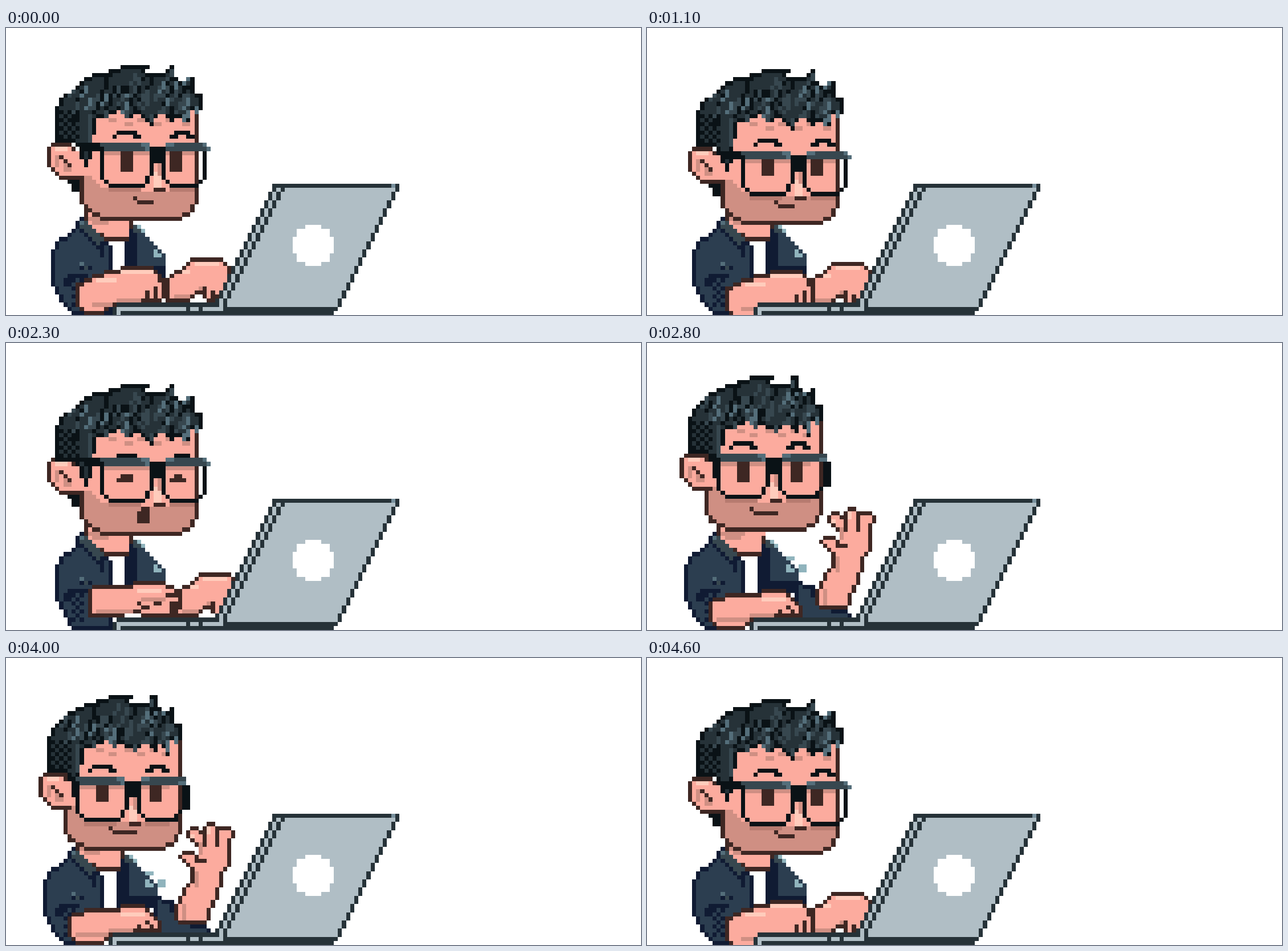
These frames come from a looping animation (1114x503 px, 4700 ms). An HTML page with a canvas:

```html
<!DOCTYPE html>
<html lang="en">
<head>
<meta charset="utf-8">
<title>Typing and waving</title>
<style>
  html, body { margin: 0; width: 100%; height: 100%; overflow: hidden; background: #fff; }
  canvas { display: block; width: 100%; height: 100%; image-rendering: pixelated; }
</style>
</head>
<body>
<canvas id="stage" width="155" height="70"></canvas>
<script>
const g = document.getElementById('stage').getContext('2d');
const C = {
  skin: '#fcab9e', shade: '#cf8f83', glow: '#ffccbc', line: '#3e2723',
  hair: '#263238', black: '#0a1216', slate: '#37474f', shine: '#546e7a',
  coat: '#2c3e50', navy: '#101b33', mint: '#90b4bd', metal: '#b0bec5'
};
let ox = 0, oy = 0;

const at = (x, y) => { ox = x; oy = y; };

function px(color, x, y, w = 1, h = 1) {
  g.fillStyle = color;
  g.fillRect(Math.round(x + ox), Math.round(y + oy), w, h);
}

const points = text => text.split(' ').map(p => p.split(',').map(Number));

// Fills a polygon cell by cell, with a one-cell outline inside its edge.
function shape(pts, fill, line, map = p => p) {
  const poly = pts.map(p => map(p));
  const cells = new Set();
  const key = (x, y) => y * 1000 + x;
  for (let y = 0; y < 75; y++) {
    const cuts = [];
    poly.forEach(([x1, y1], i) => {
      const [x2, y2] = poly[(i + 1) % poly.length];
      const c = y + 0.5;
      if ((y1 <= c) !== (y2 <= c)) cuts.push(x1 + (c - y1) / (y2 - y1) * (x2 - x1));
    });
    cuts.sort((a, b) => a - b);
    for (let i = 0; i + 1 < cuts.length; i += 2)
      for (let x = Math.ceil(cuts[i] - 0.5); x + 0.5 < cuts[i + 1]; x++) cells.add(key(x, y));
  }
  const has = (x, y) => cells.has(key(x, y));
  for (const k of cells) {
    const x = k % 1000, y = (k - x) / 1000;
    const edge = !(has(x - 1, y) && has(x + 1, y) && has(x, y - 1) && has(x, y + 1));
    const color = edge && line ? line : fill;
    if (color) px(color, x, y);
  }
  return has;
}

const FACE = points('18,17 47,17 47,42 46,44 45,46 42,47 24,47 22,46 20,45 19,44 18,41');
const BEARD = points('19,34 21,36 24,39 33,40 36,40 46,39 46,43 45,45 42,46 24,46 20,44 19,41');
const EAR = points('12,28 16,28 18,30 18,37 14,37 12,36 11,34 10,33 10,30 11,29');
const HAIR = points('12,20 13,18 15,16 18,13.5 20,12 23,11 27,10 30,9 35,9 34,10.5 39,11 40,9 41,9 41,12 44,13 45,12 46,12 46,16 48,16 48,19 47,21 45,20 45,23 44,24 43,22 42,21 41,23 39,21 37,21 36,24 35,23 34,22 32,21 30,22 28,20 26,21 25,22 22,22 22,25 21,27 21,30 20,34 19,34 18,30 17,28 12,28');
const COAT = points('17,48 18,46 20,47 23,51 26,53 26,70 17,70 14,68 13,66 12,63 11,62 11,56 12,53 14,51 16,50');
const LAPEL = points('31,47 33,49 36,52 38,55 39,57 39,61 29,61 29,54 30,51');
const ARM = points('18,62 22,60 27,59 29,58 36,58 38,60 39,62 39,66 37,67 29,67 26,68 24,70 19,70 17,67 17,63');
const FLAT_ARM = points('20,60 21,59 30,59 31,58 37,58 40,59 42,61 42,64 41,67 35,67 30,66 27,67 20,67 19,66 19,61');
const HAND = points('39,61 42,59 45,57 46,56 53,56 55,58 56,62 53,64 52,67 50,67 47,65 44,67 39,67');
const REST_ARM = points('17,62 22,61 28,61 29,60 33,60 36,62 38,65 38,67 29,67 25,68 24,70 17,70 15,67 15,63');
const RAISED = points('41.5,60 43,57 45,54 45,51.5 43,50 42,48.5 43,47 45,47 47,48.5 47,46 44,44 44,42 46,41 48,42 48,41 50,40 51,40 52,42 53,41 55,41 56,43 55,46 55,50 53.5,52 53,55 51,60 49,65 43,65 41,63');
const SLEEVE = points('36,58 41,59 42,64 49,65 50,67 50,70 36,70');

// Vertical offsets of the head parts in each expression.
const pose = (hair, brow, spec, jaw, ear, more) =>
  ({ hair, brow, spec, jaw, ear, eye: 5, wide: 0, mouth: 'smile', ...more });
const CALM = pose(0, 0, 0, 0, 0);
const BLINK = pose(0, 0, 0, 0, 0, { eye: 0 });
const DOWN = pose(1, 2, 2, 1, 1, { eye: 4 });
const RISE = pose(-2, -2, -1, -1, 0);
const UP = pose(-4, -4, -3, -2, -2);
const NOD = pose(3, 4, 3, 1, 1, { eye: 0, wide: 1, mouth: 'flat' });
const YAWN = pose(1, 2, 0, 0, 0, { eye: 0, mouth: 'open' });
const GREET = pose(-1, -1, -1, -1, -1, { front: true });
const GREET_LOW = pose(0, 1, 1, 0, 0, { eye: 4, front: true });

function poseAt(k) {
  if (k < 8) return k === 3 ? BLINK : CALM;
  if (k < 13) return DOWN;
  if (k < 19) return [CALM, RISE, UP, NOD, DOWN, CALM][k - 13];
  if (k < 24) return k < 21 ? CALM : YAWN;
  if (k < 44) return k === 24 || (k > 37 && k < 42) ? GREET_LOW : GREET;
  return k < 46 ? CALM : DOWN;
}

const noise = n => { const s = Math.sin(n * 127.1) * 43758.5; return s - Math.floor(s); };

function body(front, shift) {
  at(front ? -2 : 0, 0);
  px(C.skin, 20, 43, 11, 8);
  px(C.shade, 20, 46, 6, 1);
  px(C.shade, 21, 47, 4, 1);
  px(C.line, 19, 43, 1, 5);
  px(C.line, 30, 47, 1, 4);
  px(C.line, 24, 51, 6, 1);
  px(C.line, 22, 50, 2, 1);
  px('#fff', 24, 52, 6, 10);
  shape(LAPEL, C.navy, C.navy);
  for (let i = 0; i < 7; i++) px(C.coat, 32 + i, 49 + i, 1, 9 - i);
  px(C.slate, 31, 48, 2, 2);
  px(C.mint, 32, 48);
  px(C.mint, 33, 49);
  px(C.mint, 36, 54, 1, 2);
  px(C.mint, 37, 55);
  shape(COAT, C.coat, C.navy, ([x, y]) => [x < 17 ? x + shift : x, y]);
  for (let i = 0; i < 5; i++) {
    px(C.slate, 18 + i, 47 + i, 2, 2);
    px(C.navy, 18 + i, 49 + i);
  }
  px(C.shine, 18, 47);
  px(C.navy, 23, 52, 1, 4);
  px(C.navy, 18, 58, 3, 1);
  px(C.shine, 18, 57);
  px(C.slate, 19, 58);
  px(C.navy, 15, 60, 5, 1);
  px(C.navy, 14, 61, 2, 2);
  for (let y = 61; y < 68; y++)
    for (let x = 16; x < 19; x++) if ((x + y) & 1) px(C.navy, x, y);
}

function head(p) {
  const faceX = p.front ? -4 : 0;
  const partX = p.front ? -6 : 0;

  at(faceX, p.jaw);
  const widen = ([x, y]) => [x > 40 ? x + p.wide : x, y];
  if (!p.front) {
    px(C.black, 15, 36, 3, 2);
    px(C.black, 16, 38, 2, 2);
  }
  shape(FACE, C.skin, null, widen);
  shape(BEARD, C.shade, null, widen);
  shape(FACE, null, C.line, widen);

  at(p.front ? -2 : 0, p.ear);
  shape(EAR, C.skin, C.line);
  px(C.skin, 16, 30, 4, 6);
  px(C.glow, 12, 29, 3, 1);
  px(C.shade, 12, 31, 1, 3);
  px(C.shade, 14, 33, 2, 2);
  px(C.line, 13, 31);
  px(C.line, 14, 32);
  px(C.line, 15, 33);

  at(0, p.hair);
  const left = p.front ? 10 : 12;
  const scale = p.front ? 33 / 36 : 1 + p.wide / 36;
  const hx = x => left + (x - 12) * scale;
  for (let i = 0; i < 6; i++) px(C.shade, hx(25 + i * 3.6), 22 + i % 2, 2, 1);
  const inHair = shape(HAIR, C.hair, C.black, ([x, y]) => [hx(x), y]);
  for (let i = 0; i < 85; i++) {
    const x = Math.floor(hx(15 + noise(i + 1) * 32));
    const y = 10 + Math.floor(noise(i + 200) * 12);
    const color = [C.black, C.black, C.slate, C.slate, C.shine][i % 5];
    if (inHair(x, y)) px(color, x, y);
    if (inHair(x, y + 1)) px(color, x, y + 1);
    if (inHair(x - 1, y + 2)) px(color, x - 1, y + 2);
  }
  for (let y = 20; y < 28; y++)
    for (let x = 0; x < 6; x++) if ((x + y) & 1) px(C.black, left + x, y);
  px(C.slate, hx(20), 21, 1, 7);

  at(partX, p.brow);
  px(C.black, 27, 25, 5, 1);
  px(C.black, 26, 26);
  px(C.black, 31, 26, 2, 1);
  px(C.black, 41, 25, 4, 1);
  px(C.black, 40, 26, 2, 1);
  px(C.black, 44, 26, 2, 1);

  at(partX, p.spec);
  glasses(p.front);
  const rightEye = p.front ? 41 : 40;
  if (p.eye) {
    px(C.line, 28, 30, 3, p.eye);
    px(C.line, rightEye, 30, 3, p.eye);
  } else {
    px(C.line, 28, 32, 3, 1);
    px(C.line, 27, 33, 4, 1);
    px(C.line, 41, 32, 2, 1);
    px(C.line, 40, 33, 4, 1);
  }

  at(partX, p.jaw);
  if (p.mouth === 'open') {
    px(C.line, 33, 40, 2, 1);
    px(C.line, 32, 41, 3, 3);
  } else if (p.mouth === 'flat') {
    px(C.line, 33, 42, 3, 1);
  } else {
    px(C.line, 31, 41);
    px(C.line, 32, 42, p.front ? 6 : 4, 1);
  }
}

function glasses(front) {
  const extra = front ? 1 : 0;
  px(C.shade, 24, 30, 11, 1);
  px(C.shade, 39, 30, 7, 1);
  px(C.glow, 36, 35, 2, 4);
  px(C.shade, 37, 33, 1, 3);
  px(C.line, 36, 39, 3, 1);
  px('#b77b70', 25, 39, 8, 1);
  px('#b77b70', 40, 39, 6, 1);
  px(C.black, front ? 21 : 17, 28, front ? 3 : 7, 1);
  px(C.black, front ? 22 : 19, 29, front ? 3 : 5, 1);
  px(C.slate, 23, 28, 12, 1);
  px(C.slate, 24, 29, 11, 1);
  px(C.shine, 33, 28, 2, 1);
  px(C.shine, 34, 29);
  px(C.slate, 39, 28, 10 + extra, 1);
  px(C.slate, 38, 29, 11 + extra, 1);
  px(C.shine, 39, 28, 2, 1);
  px(C.shine, 48, 28 + extra, 1, 1);
  px(C.shine, 49, 29);
  px(C.black, 35, 29, 4, 4);
  px(C.black, 23, 30, 1, 7);
  px(C.black, 24, 37);
  px(C.black, 25, 38, 9, 1);
  px(C.black, 34, 36, 1, 2);
  px(C.black, 35, 32, 1, 4);
  px(C.black, 38, 33, 1, 4);
  px(C.black, 39, 37);
  px(C.black, 40, 38, 7 + extra, 1);
  px(C.black, 48 + extra, 30, 1 + extra, 6);
  px(C.black, 48, 36);
  px(C.black, 47, 37);
}

function typingArms(stroke, late) {
  at([0, 0, 1][stroke] + late, stroke === 1 ? 1 : 0);
  shape(HAND, C.skin, C.line);
  px(C.glow, 46, 57, 6, 1);
  px(C.glow, 43, 59, 2, 1);
  px(C.shade, 41, 65, 4, 1);
  px(C.shade, 47, 63, 2, 1);
  px(C.line, 48, 63, 1, 2);
  px(C.line, 50, 64, 1, 2);

  if (stroke === 2) {
    at(late, 0);
    shape(FLAT_ARM, C.skin, C.line);
    px(C.shade, 21, 65, 9, 1);
    px(C.shade, 32, 62, 6, 1);
    px(C.glow, 31, 60, 6, 1);
    px(C.line, 31, 63);
    px(C.line, 32, 64, 2, 1);
    px(C.line, 35, 63, 2, 1);
    px(C.line, 38, 61, 3, 1);
    px(C.line, 39, 63, 2, 3);
  } else {
    at(stroke * 2, stroke);
    shape(ARM, C.skin, C.line);
    px(C.glow, 28, 59, 8, 1);
    px(C.glow, 22, 61, 5, 1);
    px(C.shade, 21, 67, 5, 1);
    px(C.shade, 27, 66, 6, 1);
    px(C.line, 34, 64, 1, 2);
    px(C.line, 36, 63, 1, 3);
    px(C.line, 37, 60, 1, 2);
  }
}

function restArm() {
  at(0, 0);
  shape(REST_ARM, C.skin, C.line);
  px(C.glow, 28, 62, 6, 1);
  px(C.shade, 17, 67, 8, 1);
  px(C.shade, 25, 66, 6, 1);
  px(C.line, 32, 65);
  px(C.line, 34, 64);
  px(C.line, 35, 65, 1, 2);
}

function wavingArm(lean) {
  const sway = y => lean * Math.max(0, 60 - y) / 19;
  const bar = (color, x, y, w, h) => {
    for (let i = 0; i < h; i++) px(color, x + sway(y + i), y + i, w, 1);
  };
  at(0, 0);
  shape(SLEEVE, C.coat, C.navy);
  px(C.mint, 34, 52, 2, 1);
  px(C.mint, 37, 54, 2, 2);
  shape(RAISED, C.skin, C.line, ([x, y]) => [x + sway(y), y]);
  bar(C.line, 48, 42, 1, 4);
  bar(C.line, 51, 42, 1, 4);
  bar(C.line, 46, 49, 3, 1);
  bar(C.glow, 49, 41, 1, 2);
  bar(C.glow, 45, 43, 1, 1);
  bar(C.shade, 47, 45, 1, 3);
  bar(C.shade, 46, 52, 1, 4);
  bar(C.shade, 43, 60, 1, 4);
}

function laptop(front) {
  at(0, 0);
  const left = front ? 25 : 26;
  px(C.hair, left + 1, 67, 52 - left, 1);
  px(C.hair, left, 68, 54 - left, 2);
  px(C.metal, left + 1, 68, 52 - left, 1);
  px(C.metal, left + 1, 69);
  px(C.hair, 44, 68);
  px(C.hair, 47, 68);
  for (let y = 38; y < 68; y++) {
    const step = (y - 38) >> 1;
    px(C.metal, 65 - step, y, 31, 1);
    px(C.hair, 65 - step, y);
    px(C.hair, 67 - step, y);
    px(C.hair, 95 - step, y);
  }
  px(C.hair, 65, 38, 31, 1);
  px('#78909c', 94, 38);
  px(C.hair, 53, 68, 28, 1);
  px(C.hair, 28, 69, 52, 1);
  for (let y = -5; y < 5; y++)
    for (let x = -5; x < 5; x++)
      if (Math.hypot(x + 0.5, y + 0.5) < 5) px('#fff', 75 + x, 53 + y);
}

function draw(k) {
  const p = poseAt(k);
  const stroke = [0, 1, 2, 2, 1, 1, 0][k % 7];
  at(0, 0);
  px('#fff', 0, 0, 155, 70);
  body(p.front, !p.front && stroke === 2 ? 1 : 0);
  head(p);
  if (p.front) {
    if (k > 24) wavingArm(Math.round(3 * Math.sin((k - 28) * Math.PI / 3)));
    else {
      at(0, 0);
      shape(HAND, C.skin, C.line);
    }
    restArm();
  } else {
    typingArms(stroke, k > 18 && k < 24 ? 1 : 0);
  }
  laptop(p.front);
}

let shown = -1;
function tick() {
  const k = Math.floor(performance.now() % 4700 / 100);
  if (k !== shown) draw(shown = k);
  requestAnimationFrame(tick);
}
tick();
</script>
</body>
</html>
```
